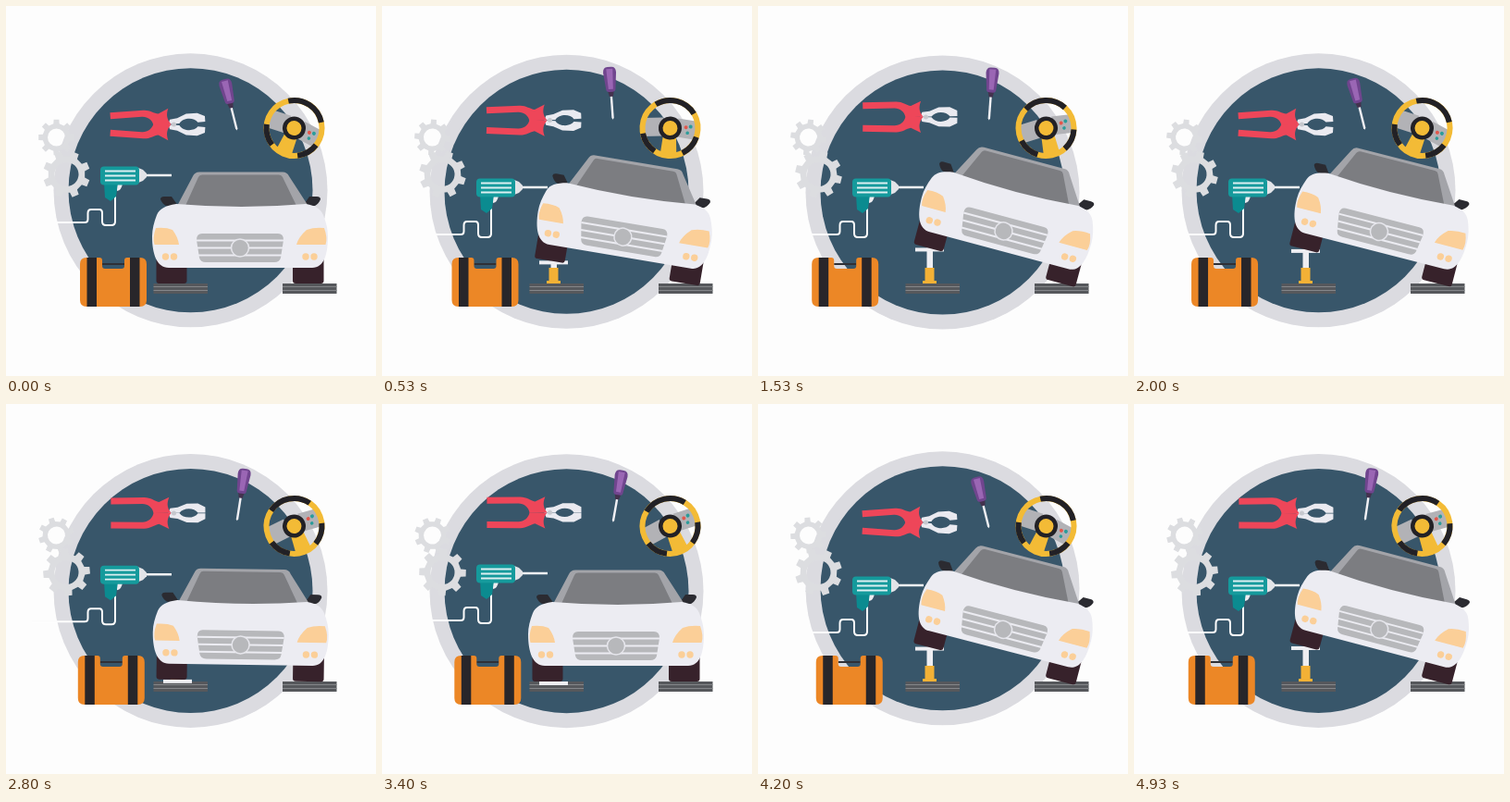
An HTML page for the animation above (4990 ms loop, 400x400 px).

```html
<!DOCTYPE html>
<html lang="en">
<head>
<meta charset="utf-8">
<title>Car workshop</title>
<style>
  html, body { margin: 0; width: 100%; height: 100%; overflow: hidden; background: #fdfdfd; }
  svg { display: block; width: 100%; height: 100%; }
  .gear { fill: #dcdde0; fill-rule: evenodd; }
  .wire { fill: none; stroke: #fdfdfd; stroke-width: 2; stroke-linejoin: round; }
  .lamp { fill: #fbcf98; }
  .tyre { fill: #37222b; }
  .rim { fill: none; stroke-width: 6; }
</style>
</head>
<body>
<svg viewBox="0 0 400 400">
  <defs>
    <g id="plierHalf">
      <path fill="#eaeaf0" d="M2 0L4 -5L12 -6L22 -10H34L42 -6V0H34C30 -6 18 -6 14 0Z"/>
      <path fill="#ee4659" d="M-60 -17H-24C-17 -17 -13 -13 -8 -12L3 -17C0 -10 1 -5 5 0H-14C-15 -6 -20 -10 -26 -10H-60Z"/>
    </g>
    <g id="mat">
      <rect y="300" width="58.500" height="11" fill="#56585c"/>
      <path d="M0 303.500H58.500M0 307.500H58.500" stroke="#85878a"/>
    </g>
  </defs>

  <g id="badge">
    <circle cx="199.500" r="148" fill="#dbdbe0"/>
    <circle cx="199.500" r="132" fill="#38566a"/>
  </g>

  <path id="smallGear" class="gear"/>
  <path id="bigGear" class="gear"/>

  <g id="pliers">
    <use id="lowerHalf" href="#plierHalf"/>
    <use id="upperHalf" href="#plierHalf"/>
    <circle cx="8" r="2.500" fill="#c6c8ce"/>
  </g>

  <g id="driver">
    <path d="M-1.200 -30H1.200V-2L0 0L-1.200 -2Z" fill="#f0f0f4"/>
    <path d="M-3.500 -32H3.500L2 -25H-2Z" fill="#43324e"/>
    <path d="M-7 -51Q-7 -57 -2 -57H2Q7 -57 7 -51L5 -32Q4.500 -30 2 -30H-2Q-4.500 -30 -5 -32Z" fill="#70458e"/>
    <path d="M-3.500 -55H3.500L2.500 -33H-2.500Z" fill="#9a66b4"/>
  </g>

  <g id="wheel">
    <path d="M-30 -9L-8 -11V9L-29 11ZM30 -9L8 -11V9L29 11Z" fill="#b2b2b6"/>
    <path d="M-7 8H7L9 31H-9Z" fill="#f3bb36"/>
    <circle class="rim" r="30" stroke="#f3bb36"/>
    <g id="rimArcs" class="rim" stroke="#222126"></g>
    <circle r="12.500" fill="#222126"/>
    <circle r="8" fill="#f3bb36"/>
    <circle cx="17" cy="-2" r="2" fill="#e2574c"/>
    <circle cx="22" cy="-3" r="2" fill="#2b9c9a"/>
    <circle cx="19" cy="4" r="1.800" fill="#2b9c9a"/>
  </g>

  <g id="drill">
    <path class="wire" d="M28 234H85Q88.500 234 88.500 230.500V224Q88.500 220 92 220H101Q104 220 104 224V233Q104 237 108 237H114Q118 237 118 233V206"/>
    <path d="M151 183H179" stroke="#f4f4f6" stroke-width="2.500"/>
    <path d="M120 192H126Q125 199 120 200Z" fill="#ececf0"/>
    <path d="M106 191H121L119 206L113 211L107 207Z" fill="#0b8b90"/>
    <path d="M143 175L148 177L152 181V185L148 189L143 191Z" fill="#e2e4e8"/>
    <rect x="102" y="173.500" width="42" height="20" rx="4" fill="#159a9c"/>
    <path d="M107 178.500H140M107 183.500H140M107 188.500H140" stroke="#dcf0f2" stroke-width="1.800"/>
  </g>

  <use href="#mat" x="159.500"/>
  <use href="#mat" x="299"/>

  <g id="jack">
    <rect id="stem" x="182.500" width="6.500" fill="#eeeef2"/>
    <path d="M180.500 283H190.500V297H193V300H178V297H180.500Z" fill="#f3b136"/>
    <rect id="plate" x="170" width="31" height="4" fill="#eeeef2"/>
  </g>

  <g id="car">
    <rect class="tyre" x="162.500" y="272" width="33" height="28" rx="3"/>
    <rect class="tyre" x="310" y="272" width="33.500" height="28" rx="3"/>
    <path d="M167 209Q167 206 171 206H179L186 216H173Q169 214 167 209ZM340 209Q340 206 336 206H328L321 216H334Q338 214 340 209Z" fill="#2b2b31"/>
    <path d="M184 218L202 184Q204 179.500 209 179.500H299Q304 179.500 306 184L328 218Z" fill="#a3a4a9"/>
    <path d="M193 218L208 185Q209 182.500 212 182.500H295Q298 182.500 299 185L315 218Z" fill="#7c7d81"/>
    <path d="M184 214Q255 220 324 214C335 216 340 219 343 226C346 234 348 241 348 249C348 268 344 283 331 283H176C163 283 158 268 158 249C158 241 160 234 163 226C166 219 172 216 184 214Z" fill="#ececf2"/>
    <path class="lamp" d="M162 240Q173 239 180 242Q186 250 187 258H160.500Q158 251 162 240ZM344 240Q333 239 325 242Q316 250 314 258H345.500Q348 251 344 240Z"/>
    <g class="lamp">
      <circle cx="172.500" cy="271" r="3.700"/><circle cx="181.500" cy="271" r="3.700"/>
      <circle cx="324" cy="271" r="3.700"/><circle cx="333" cy="271" r="3.700"/>
    </g>
    <path d="M212 246H294Q300 246 300 253L297 272Q296 277 290 277H216Q210 277 209 272L206 253Q206 246 212 246Z" fill="#b7b8bb"/>
    <path d="M206 253.500H300M207 261.500H299M208 269.500H298" stroke="#ececf2" stroke-width="2"/>
    <circle cx="253" cy="261.500" r="9.500" fill="#b7b8bb" stroke="#e6e6ec" stroke-width="1.500"/>
  </g>

  <g id="bag">
    <path d="M24 279H48" stroke="#2f3036" stroke-width="2"/>
    <path d="M7 272H21Q24 272 24 275V281Q24 284 27 284H45Q48 284 48 281V275Q48 272 51 272H65Q72 272 72 279V318Q72 325 65 325H7Q0 325 0 318V279Q0 272 7 272Z" fill="#ec8726"/>
    <path d="M7.500 272H18V325H7.500ZM54 272H64.500V325H54Z" fill="#28262a"/>
  </g>
</svg>

<script>
  const LOOP = 4990, FPS = 15, BEAT = 1040;
  const el = id => document.getElementById(id);
  const pose = (id, value) => el(id).setAttribute("transform", value);
  const wave = (t, period) => Math.cos(2 * Math.PI * t / period);
  const polar = (r, deg) => {
    const a = deg * Math.PI / 180;
    return (r * Math.cos(a)).toFixed(2) + " " + (r * Math.sin(a)).toFixed(2);
  };

  function gearPath(outer, root, hole, teeth) {
    const pitch = 360 / teeth, points = [];
    for (let i = 0; i < teeth; i++) {
      const a = i * pitch;
      points.push(polar(root, a - pitch * .27), polar(outer, a - pitch * .19),
                  polar(outer, a + pitch * .19), polar(root, a + pitch * .27));
    }
    return `M${points.join("L")}ZM${hole} 0A${hole} ${hole} 0 1 0 ${-hole} 0A${hole} ${hole} 0 1 0 ${hole} 0Z`;
  }

  el("bigGear").setAttribute("d", gearPath(25.5, 20, 13, 8));
  el("smallGear").setAttribute("d", gearPath(19.5, 15, 9.5, 8));
  el("rimArcs").innerHTML = [[-125, -35], [15, 60], [120, 165]]
    .map(([a, b]) => `<path d="M${polar(30, a)}A30 30 0 0 1 ${polar(30, b)}"/>`).join("");

  // Springy rise of the car, mirrored in time for the way down.
  function liftAt(t) {
    const period = 3 * BEAT, phase = t % period;
    const s = (Math.min(phase, period - phase) - 275) / 1000;
    if (s <= 0) return 0;
    return 1 - Math.exp(-3.5 * s) * (Math.cos(7 * s) + .5 * Math.sin(7 * s));
  }

  function draw(t) {
    const swing = wave(t, 2 * BEAT), half = (1 - swing) / 2;
    const eased = half * half * (3 - 2 * half);
    const lift = liftAt(t), turn = 90 * t / BEAT;

    pose("badge", `translate(0 ${201 - 1.7 * swing})`);
    pose("bigGear", `translate(65.5 182) rotate(${22.5 + turn})`);
    pose("smallGear", `translate(54.5 142) rotate(${-turn})`);

    const gap = 4 * (1 - eased);
    pose("pliers", `translate(173.500 ${128 - 11.5 * eased})`);
    pose("upperHalf", `rotate(${-gap})`);
    pose("lowerHalf", `rotate(${gap}) scale(1 -1)`);

    const hop = 6 * (1 - wave(t, BEAT));
    pose("driver", `translate(249.700 ${134.5 - hop}) rotate(${26 * eased - 14})`);
    pose("wheel", `translate(311.5 132) rotate(${23 - 50 * eased})`);
    pose("drill", `translate(0 ${13 * Math.min(1.7 * lift, 1)})`);

    const tilt = 15 * lift;
    const top = 300 - 149 * Math.sin(tilt * Math.PI / 180);
    pose("car", `rotate(${tilt} 328 300)`);
    el("jack").style.display = lift > 0 ? "" : "none";
    el("plate").setAttribute("y", top);
    el("stem").setAttribute("y", top);
    el("stem").setAttribute("height", Math.max(0, 300 - top));
    pose("bag", `translate(${69 + 11 * wave(t, 3 * BEAT)} 0)`);
  }

  const start = performance.now();
  function tick() {
    const t = (performance.now() - start) % LOOP;
    draw(Math.floor(t * FPS / 1000) * 1000 / FPS);
    requestAnimationFrame(tick);
  }
  tick();
</script>
</body>
</html>
```
